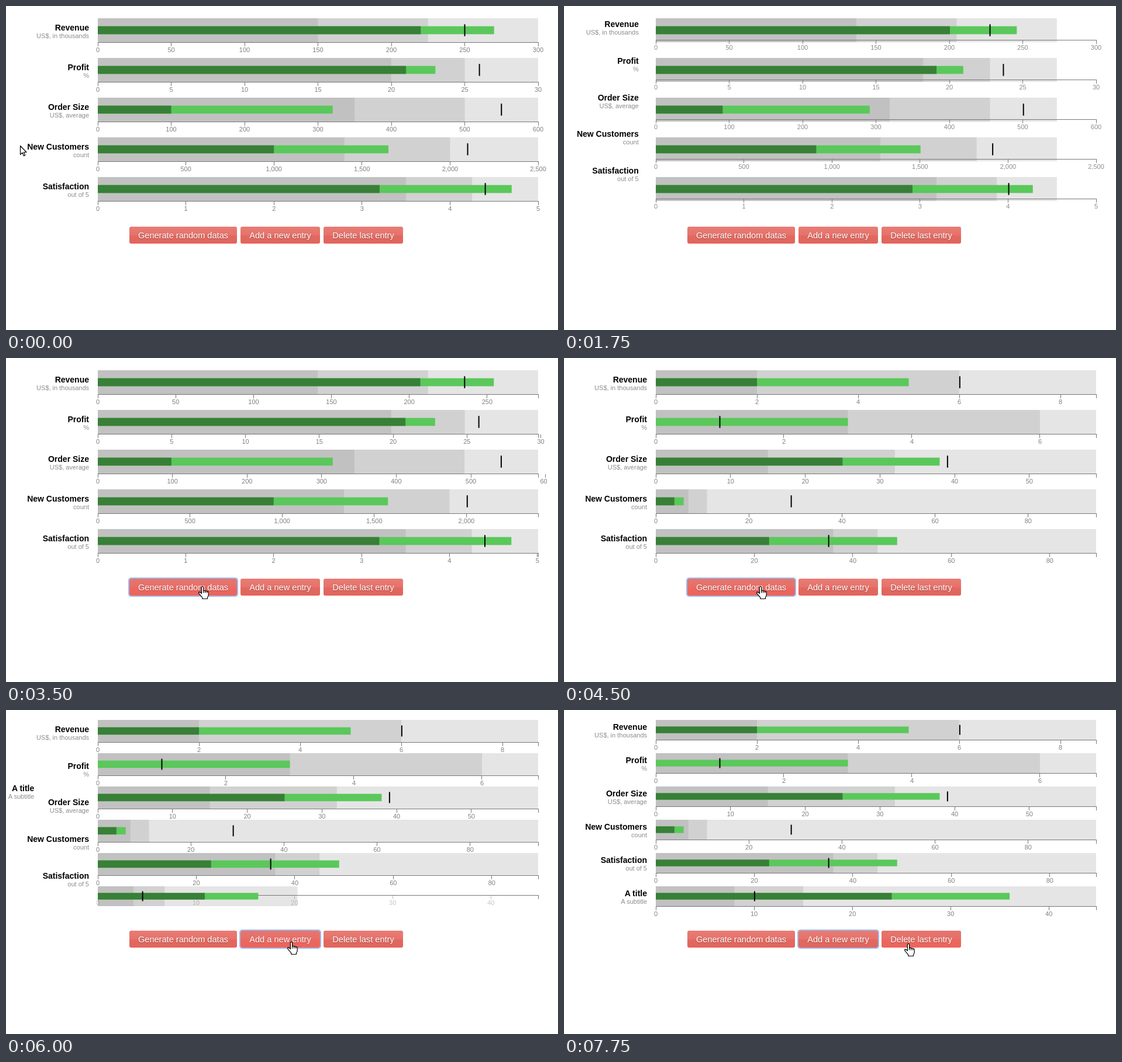
An HTML page for the animation above (8 s loop, 944 by 555 pixels).

```html
<!DOCTYPE html>
<html lang="en">
<head>
<meta charset="utf-8">
<title>Bullet charts</title>
<style>
  html, body { margin: 0; width: 100%; height: 100%; overflow: hidden; background: #fff; }
  body { position: relative; font-family: "Liberation Sans", Arial, sans-serif; }
  svg { position: absolute; left: 0; top: 0; display: block; overflow: hidden; }
  .title { font-size: 14px; font-weight: bold; text-anchor: end; }
  .sub { font-size: 11px; fill: #8c8c8c; text-anchor: end; }
  .tick { font-size: 11px; fill: #808080; text-anchor: middle; }
  .axis { fill: none; stroke: #777; shape-rendering: crispEdges; }
  .btn {
    position: absolute; top: 378px; height: 29px; border-radius: 3px;
    font-size: 14.6px; line-height: 30px; text-align: center; white-space: nowrap;
    color: #fff; text-shadow: 0 1px 1px rgba(0, 0, 0, .35);
    background: linear-gradient(#e77c75, #e6726a 50%, #e2685f 50%, #e2655d);
  }
  .btn.hover { background: linear-gradient(#e5766f, #e66e67 50%, #ed675f 50%, #ec645c); }
  .btn.focus { box-shadow: 0 0 0 2px #9dbbf0; }
  #cursor path { fill: #fff; stroke: #000; stroke-width: 1.2; stroke-linejoin: round; }
</style>
</head>
<body>
<svg id="chart" width="925" height="365"></svg>
<div class="btn" style="left:211px;width:184px">Generate random datas</div>
<div class="btn" style="left:401px;width:136px">Add a new entry</div>
<div class="btn" style="left:543px;width:136px">Delete last entry</div>
<svg id="cursor" width="944" height="555"></svg>
<script>
const LOOP = 8000, STEP = 250;
const LEFT = 157, WIDTH = 753;
const INTRO = 1081, RANDOM = 3423, ADD = 5516;
const TITLE_LEAD = 11;

// Values: tick step, maximum, low range, mid range, dark bar, light bar, marker
const rows = [
  ['Revenue', 'US$, in thousands', [50, 300, 150, 225, 220, 270, 250], [2, 8.705, 2, 6, 2, 5, 6.01]],
  ['Profit', '%', [5, 30, 20, 25, 21, 23, 26], [2, 6.877, 3, 6, 0, 3, 1]],
  ['Order Size', 'US$, average', [100, 600, 350, 500, 100, 320, 550], [10, 58.94, 15, 32, 25, 38, 39.05]],
  ['New Customers', 'count', [500, 2500, 1400, 2000, 1000, 1650, 2100], [20, 94.6, 7, 11, 4, 6, 29.1]],
  ['Satisfaction', 'out of 5', [1, 5, 3.5, 4.25, 3.2, 4.7, 4.4], [20, 89.4, 36, 45, 23, 49, 35.1]],
  ['A title', 'A subtitle', [10, 44.8, 8, 15, 24, 36, 10.05]]
];

// Pointer tip: time, x, y
const trail = [
  [2500, 300, 275], [3000, 336, 391], [4500, 336, 391], [5250, 488, 397],
  [6750, 488, 397], [7250, 540, 410], [7750, 589, 400]
];

const ARROW = 'M.5 .5V15.5L4 12.3L6.5 17.8L8.7 16.8L6.3 11.5H11Z';
const HAND = 'M-1.6 2a1.6 1.6 0 0 1 3.2 0V7.6q1.8-.8 3 .5q1.8-.6 3 .8q2.6-.5 2.6 1.7V15' +
  'q0 2-1.8 4.3V21.5H-.2V19.3L-5.8 12.6q-1.6-2.6 .8-2.7q1.6 .2 3.4 2.6Z' +
  'M1.6 7.5V11.5M4.6 8V11.5M7.6 9V11.5';

const chart = document.getElementById('chart');
const cursor = document.getElementById('cursor');
const buttons = [...document.querySelectorAll('.btn')];

const lerp = (a, b, p) => a + (b - a) * p;
const clamp = p => Math.min(1, Math.max(0, p));
const ease = p => (p = clamp(p)) < .5 ? 4 * p ** 3 : 1 - 4 * (1 - p) ** 3;
const progress = (t, start, length = 1000) => ease((t - start) / length);
const intro = (t, lead = 0) => t < INTRO ? 1 : progress(t + lead, INTRO, 931);

const rect = (y, w, h, fill) =>
  `<rect x="${LEFT}" y="${y}" width="${w}" height="${h}" fill="${fill}"/>`;
const text = (cls, x, y, s) => `<text class="${cls}" x="${x}" y="${y}">${s}</text>`;

function tick(x, y, value, opacity) {
  if (opacity <= 0 || x > 800) return '';
  const px = Math.floor(LEFT + x) + .5;
  return `<g opacity="${opacity}"><path class="axis" d="M${px} ${y + .5}v6"/>` +
    text('tick', LEFT + x, y + 17, value.toLocaleString('en-US')) + '</g>';
}

// Ticks slide between both scales while one set fades into the other.
function ticks(from, to, mix, grow, y) {
  let out = tick(0, y, 0, grow);
  const add = (set, opacity) => {
    for (let v = set[0]; v <= set[1]; v += set[0])
      out += tick(lerp(v / from[1], v / to[1], mix) * WIDTH, y, v, opacity);
  };
  add(from, grow * (1 - mix));
  if (to !== from) add(to, grow * mix);
  return out;
}

function bullet([name, sub, from, to = from], i, t) {
  const isNew = i === 5, added = t >= ADD;
  const mix = isNew ? 0 : progress(t, RANDOM);
  const add = progress(t, ADD), addTitle = progress(t + TITLE_LEAD, ADD);
  const grow = isNew ? add : intro(t);
  const growTitle = isNew ? addTitle : intro(t, TITLE_LEAD);
  const top = added ? 17 + 57 * i : 21 + 68 * i;
  const h = isNew ? 34 : lerp(41, 34, add);
  const axisY = Math.round(top + h * grow);
  const w = k => lerp(from[k] / from[1], to[k] / to[1], mix) * WIDTH * grow;
  const titleX = lerp(-40, 142, growTitle);
  const titleEnd = isNew ? 34 + 57 * i : lerp(42 + 68 * i, 34 + 57 * i, addTitle);
  const titleY = Math.round(lerp(-31, titleEnd, growTitle));

  return rect(top, w(1), h, '#e5e5e5') + rect(top, w(3), h, '#d1d1d1') + rect(top, w(2), h, '#c1c1c1') +
    ticks(from, to, mix, grow, axisY) +
    `<path class="axis" d="M${LEFT + .5} ${axisY + 6}V${axisY + .5}H${LEFT + WIDTH + .5}v6"/>` +
    rect(top + h / 3, w(5), h / 3, '#5ac85a') + rect(top + h / 3, w(4), h / 3, '#387f38') +
    `<path d="M${LEFT + w(6)} ${top + h / 4}v${h / 2}" stroke="#000" stroke-width="2"/>` +
    text('title', titleX, titleY, name) + text('sub', titleX, titleY + 13, sub);
}

function pointer(t) {
  if (t < STEP) return [24, 239];
  if (t < trail[0][0]) return null;
  const n = trail.findIndex(k => k[0] >= t);
  if (n < 1) return trail[n < 0 ? trail.length - 1 : 0].slice(1);
  const a = trail[n - 1], b = trail[n], p = (t - a[0]) / (b[0] - a[0]);
  return [lerp(a[1], b[1], p), lerp(a[2], b[2], p)];
}

function render(t) {
  const count = t < ADD ? 5 : 6;
  chart.innerHTML = rows.slice(0, count).map((r, i) => bullet(r, i, t)).join('');

  const tip = pointer(t);
  const focused = t >= 5500 ? 1 : t >= 3400 ? 0 : -1;
  let over = false;
  buttons.forEach((b, i) => {
    const hit = !!tip && tip[0] >= b.offsetLeft && tip[0] < b.offsetLeft + b.offsetWidth &&
      tip[1] >= b.offsetTop && tip[1] < b.offsetTop + b.offsetHeight;
    over = over || hit;
    b.classList.toggle('hover', hit);
    b.classList.toggle('focus', i === focused);
  });
  cursor.innerHTML = tip ? `<path transform="translate(${tip})" d="${over ? HAND : ARROW}"/>` : '';
}

// The picture advances four times a second.
const begin = performance.now();
let shown = -1;
function loop() {
  const t = Math.floor((performance.now() - begin) % LOOP / STEP) * STEP;
  if (t !== shown) render(shown = t);
  requestAnimationFrame(loop);
}
loop();
</script>
</body>
</html>
```
